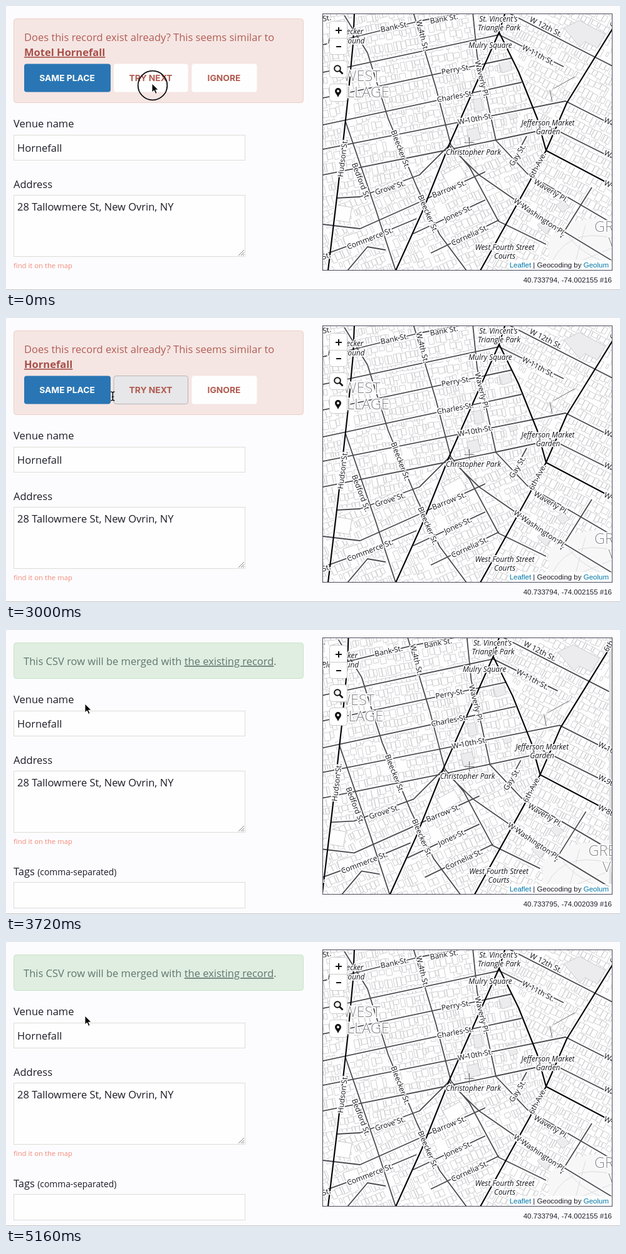
An HTML page for the animation above (5220 ms loop, 980x454 px).

```html
<!DOCTYPE html>
<html lang="en">
<head>
<meta charset="utf-8">
<title>Record matching form</title>
<style>
html, body { margin: 0; width: 100%; height: 100%; overflow: hidden; background: #fcfcfe; }
svg { display: block; width: 980px; height: 454px; }
text { font-family: "Open Sans", "Noto Sans", sans-serif; font-size: 16.5px; fill: #1c1c28; white-space: pre; }
.field { fill: #fefefe; stroke: #dcdcd8; }
.link { text-decoration: underline; }
.btn { font: 700 13.8px Inter, sans-serif; text-anchor: middle; fill: #b05a50; }
.small { font-size: 11.3px; }
.arial { font: 11.5px "Liberation Sans", Arial, sans-serif; }
.label { font-size: 12px; text-anchor: middle; dominant-baseline: central; paint-order: stroke; stroke: #fff; stroke-width: 3.5px; stroke-linejoin: round; fill: #14141c; }
.place { font-size: 11.8px; font-style: italic; }
.area { font-size: 23.5px; font-weight: 300; fill: #88888c; }
.line { fill: none; stroke-linejoin: round; }
</style>
</head>
<body>
<svg viewBox="0 0 980 454">
  <defs>
    <clipPath id="frame"><path d="M506 13H967V422H506z"/></clipPath>
  </defs>
  <rect width="980" height="454" fill="#fcfcfe"/>

  <g id="ask">
    <rect x="12.5" y="20.5" width="462" height="134" rx="4" fill="#f5e6e3" stroke="#eccfc8"/>
    <text x="29" y="56" style="fill:#b25c55">Does this record exist already? This seems similar to</text>
    <text id="match" class="link" x="29" y="80" style="fill:#a8504a;font-weight:700"></text>
    <rect x="29" y="92.500" width="138" height="45" rx="4" fill="#2a76b4"/>
    <rect id="next" x="172" y="92.500" width="118.500" height="45" rx="4"/>
    <rect x="296.500" y="92.500" width="104" height="45" rx="4" fill="#fefefe"/>
    <text class="btn" x="97.500" y="119.500" style="fill:#fff">SAME PLACE</text>
    <text class="btn" x="231" y="119.500">TRY NEXT</text>
    <text class="btn" x="348" y="119.500">IGNORE</text>
  </g>

  <g id="merged">
    <rect x="12.5" y="20.5" width="462" height="57" rx="4" fill="#dfeee0" stroke="#cbe0ca"/>
    <text x="28" y="56" style="fill:#627670">This CSV row will be merged with <tspan class="link">the existing record</tspan>.</text>
  </g>

  <g id="form">
    <text x="12" y="194">Venue name</text>
    <rect class="field" x="12.5" y="206.500" width="369" height="40"/>
    <text x="18" y="233">Hornefall</text>
    <text x="12" y="291">Address</text>
    <rect class="field" x="12.5" y="302.500" width="369" height="98"/>
    <text x="18" y="327">28 Tallowmere St, New Ovrin, NY</text>
    <path d="M371 399l9-9M375 399l5-5M378 399l2-2" stroke="#808084"/>
    <text class="small" x="12" y="419" style="fill:#f28c78">find it on the map<tspan id="loading" fill="#85857c"> (loading)</tspan></text>
    <text x="12" y="469">Tags <tspan style="font-size:13.9px">(comma-separated)</tspan></text>
    <rect class="field" x="12.5" y="480.500" width="369" height="41"/>
  </g>

  <g clip-path="url(#frame)">
    <rect x="506" y="13" width="461" height="409" fill="#dedede"/>
    <g id="map"></g>
    <path d="M739.500 210v16M731.500 218.500h16" stroke="#6c6c70"/>
    <rect x="802" y="406" width="165" height="16" fill="#fff" opacity=".75"/>
    <text class="arial" x="962" y="418" text-anchor="end"><tspan fill="#0078a8">Leaflet</tspan> | Geocoding by <tspan fill="#0078a8">Geolum</tspan></text>
    <g id="controls" fill="#fff" stroke="#cacacc">
      <rect x="516.500" y="24.500" width="28" height="53" rx="4"/>
      <rect x="516.500" y="87.500" width="28" height="27" rx="4"/>
      <rect x="516.500" y="124.500" width="28" height="28" rx="4"/>
      <path d="M517 51.500h27"/>
      <g stroke="#111" stroke-width="2" fill="none">
        <path d="M526 39h10M531 34v10M527 65h8"/>
        <circle cx="529" cy="100" r="4.800"/>
        <path d="M532.500 103.500l5 5" stroke-width="2.800"/>
      </g>
      <path d="M530 146C528 141 525 139 525 136a5 5 0 0 1 10 0C535 139 532 141 530 146z" fill="#111" stroke="none"/>
      <circle cx="530" cy="136" r="1.900" stroke="none"/>
    </g>
  </g>
  <rect x="505.500" y="12.500" width="462" height="410" fill="none" stroke="#4c4c60"/>
  <text id="coords" class="arial" x="967" y="442" text-anchor="end"></text>
  <path d="M0 453.500H980" stroke="#c4c4c6"/>

  <g id="cursor" stroke-linejoin="round">
    <circle id="ring" cx="1" cy="3" r="23.300" fill="none" stroke="#101014" stroke-width="1.800"/>
    <path id="arrow" d="M0 0V14l3.300-3 2.400 5.400 2.400-1-2.400-5.300h4.500z" fill="#000" stroke="#fff"/>
    <path id="hand" d="M-1.500 3q0-2 1.500-2t1.500 2v5q2-1.500 3 0 2-1 3 .8 2.500-.5 2.500 2V14q0 2-2 4.500H1L-4.500 12q-1-2.500 1-2.200L-1.500 11.500zM2.500 12v4M5 12v4M7 12v4" fill="#fff" stroke="#000" stroke-width="1.200"/>
    <path id="beam" d="M-3-7q3 0 3 2 0-2 3-2M0-5V5M-3 7q3 0 3-2 0 2 3 2M-1.500 1h3" fill="none" stroke="#000" stroke-width="1.300"/>
  </g>
</svg>
<script>
const $ = id => document.getElementById(id);

let seed = 11;
const rand = () => (seed = seed * 16807 % 2147483647) / 2147483647;

// Rows of small building outlines, tilted to the local street grid
function buildings(id, outline, angle) {
  let d = '';
  for (let y = -300; y < 300; y += 17)
    for (let x = -350; x < 350;) {
      const w = 3 + rand() * 7, h = 7 + rand() * 8;
      if (rand() < .9) {
        const top = rand() * 2;
        d += `M${x.toFixed(1)} ${(y + top).toFixed(1)}h${w.toFixed(1)}v${h.toFixed(1)}h${(-w).toFixed(1)}z`;
        if (rand() < .4) d += `m${(w / 2).toFixed(1)} ${h.toFixed(1)}v${(16 - h).toFixed(1)}`;
      }
      x += w + (rand() < .12 ? 3 : .5);
    }
  return `<clipPath id="${id}"><path d="${outline}"/></clipPath>
    <g clip-path="url(#${id})"><path d="${outline}" fill="#fefefe"/>
    <path class="line" transform="translate(740 218) rotate(${angle})" d="${d}" stroke="#cacacd" stroke-width=".8"/></g>`;
}

const avenues = [
  'M514 423L530 290 545 155 554 60 556 10',
  'M622 423L664 330 708 220 787 42 797 10',
  'M787 42L818 105 848 180 862 231 970 288',
  'M972 30L895 155 862 231 835 282 757 423'
];
const streets = [
  'M506 62L575 45 660 24 745 8',
  'M506 106L787 46 890 97',
  'M506 147L808 83',
  'M506 190L823 122',
  'M506 229L893 152 972 192',
  'M506 270L705 230 783 214 858 198',
  'M528 307L565 305 660 270 708 222',
  'M506 349L565 356 650 318 765 265',
  'M650 364L765 310',
  'M678 395L787 342',
  'M506 398L581 371 655 340',
  'M745 10L752 80 768 150 782 215 832 268 972 350',
  'M706 222L755 270 850 336 972 410',
  'M650 10L686 130 710 222 740 258 786 344 862 381',
  'M542 185L590 325 622 423',
  'M540 15L577 75 610 180 656 290 692 365 735 423',
  'M805 256L831 208',
  'M800 10L972 98',
  'M862 190L972 245',
  'M545 423L577 385 606 390',
  'M935 290L885 370'
];
const labels = [
  ['Bank St.', 620, 33, -12], ['Bank St.', 699, 20, -10], ['Perry St.', 718, 101, -10],
  ['Charles St.', 717, 144, -11], ['W 10th St.', 749, 180, -11], ['W-4th St.', 665, 47, 76],
  ['Waverly Pl.', 760, 117, 76], ['W 11th St.', 850, 78, 28], ['W 12th St.', 862, 33, 27],
  ['Hudson St.', 537, 243, -83], ['Bleecker St.', 630, 229, 69], ['Bedford St.', 567, 280, 69],
  ['Grove St.', 613, 290, -18], ['Barrow St.', 707, 292, -22], ['Bleecker St.', 674, 332, 67],
  ['Jones St.', 721, 331, -25], ['Cornelia St.', 740, 366, -25], ['Commerce St.', 581, 371, -21],
  ['Gay St.', 816, 238, -58], ['6th Ave.', 848, 254, -62], ['Waverly Pl.', 870, 295, 31],
  ['W Washington Pl.', 852, 337, 34], ['W 9th', 970, 241, 27], ['W 8th', 970, 289, 27],
  ['W 10th', 973, 190, 27], ['St.', 512, 19, -10], ['St.', 511, 399, -18], ['6th', 971, 25, -60]
];
const places = [
  ["St. Vincent's", 786, 20], ['Triangle Park', 787, 34], ['Mulry Square', 773, 62],
  ['Jefferson Market', 865, 186], ['Garden', 865, 200], ['Christopher Park', 746, 233],
  ['West Fourth Street', 796, 385], ['Courts', 796, 399], ['Bleecker', 549, 40],
  ['Playground', 543, 55]
];
const line = (paths, color, width) =>
  `<path class="line" d="${paths.join('')}" stroke="${color}" stroke-width="${width}"/>`;
const label = (kind, [text, x, y, angle = 0]) =>
  `<text class="label ${kind}" transform="translate(${x} ${y}) rotate(${angle})">${text}</text>`;

$('map').innerHTML = `<rect x="480" y="0" width="492" height="440" fill="#fefefe"/>`
  + buildings('west', 'M480 0H972V440H480z', -11)
  + buildings('east', 'M800 0H972V440H750L862 231 787 42z', 28)
  + buildings('south', 'M480 310L570 305 708 225 862 231 750 440H480z', -24)
  + `<path d="M866 370L900 345 972 335V423H866z" fill="#f7f7f7"/>
    <path class="line" d="M866 423Q890 350 972 372M880 423L972 385M895 365Q920 400 972 415M925 350L905 423" stroke="#dcdcde"/>
    <path d="M735 198l18-4 5 18-18 5zM890 35l25-12 42 22-13 22-20-10-8 8zM785 86l18-4 5 20-16 5zM848 350l10-8 12 11-8 12zM878 318l12-8 9 12-11 8zM745 150l13-3 4 20-13 3zM800 165l12-3 5 16-12 4z" fill="#ececee" stroke="#c0c0c4" stroke-width=".8"/>
    <path d="M697 270l28-15 10 18-28 16zM528 318l24 4-4 24-23-4zM538 369l22-7 6 16-23 7z" fill="#fefefe" stroke="#c8c8cc"/>
    <path class="line" d="M868 134l5 25M874 132l34-19" stroke="#707074"/>`
  + line([...avenues, ...streets], '#fefefe', 6)
  + line(streets, '#4a4a50', 1.8)
  + line(avenues, '#08080c', 2.2)
  + [['WEST', 568, 111], ['VILLAGE', 568, 137], ['GREENWICH', 1005, 352], ['VILLAGE', 1005, 378]].map(l => label('area', l)).join('')
  + labels.map(l => label('', l)).join('')
  + places.map(l => label('place', l)).join('');

const LOOP = 5220, MERGE = 3420;
const matches = [[2400, 'Hornefall'], [1500, 'After Hornefall'], [240, 'Old Fort Hornefall'], [0, 'Motel Hornefall']];
const clicks = [[0, 180], [1380, 1560], [2280, 2460], [3240, 3420]];
const span = (t, a, b) => Math.min(1, Math.max(0, (t - a) / (b - a)));
const ease = p => 1 - (1 - p) ** 3;
const show = (id, on) => $(id).setAttribute('visibility', on ? 'visible' : 'hidden');
const move = (id, x, y) => $(id).setAttribute('transform', `translate(${x} ${y})`);

function draw() {
  const t = performance.now() % LOOP, merged = t >= MERGE;
  show('ask', !merged);
  show('merged', merged);
  move('form', 0, merged ? -77 : 0);
  $('match').textContent = matches.find(m => t >= m[0])[1];
  const focused = t >= 180;
  $('next').setAttribute('fill', focused ? '#e7e6e8' : '#fefefe');
  $('next').setAttribute('stroke', focused ? '#b6b4b8' : 'none');

  const pan = ease(span(t, MERGE, 3570)) - ease(span(t, 3660, 3880));
  const away = merged && t < 3880;
  move('map', -25 * pan, pan);
  show('loading', merged && t < 3720);
  $('coords').textContent = away ? '40.733795, -74.002039 #16' : '40.733794, -74.002155 #16';

  const p = span(t, 2790, 3150), x = 233 - 107 * p;
  const beam = x > 167 && x < 172;
  const arrow = t < 180 || merged;
  move('cursor', x, beam ? 125 : 124 - 6 * p);
  show('arrow', arrow);
  show('beam', beam);
  show('hand', !arrow && !beam);
  show('ring', clicks.some(([a, b]) => t >= a && t < b));
  requestAnimationFrame(draw);
}
draw();
</script>
</body>
</html>
```
